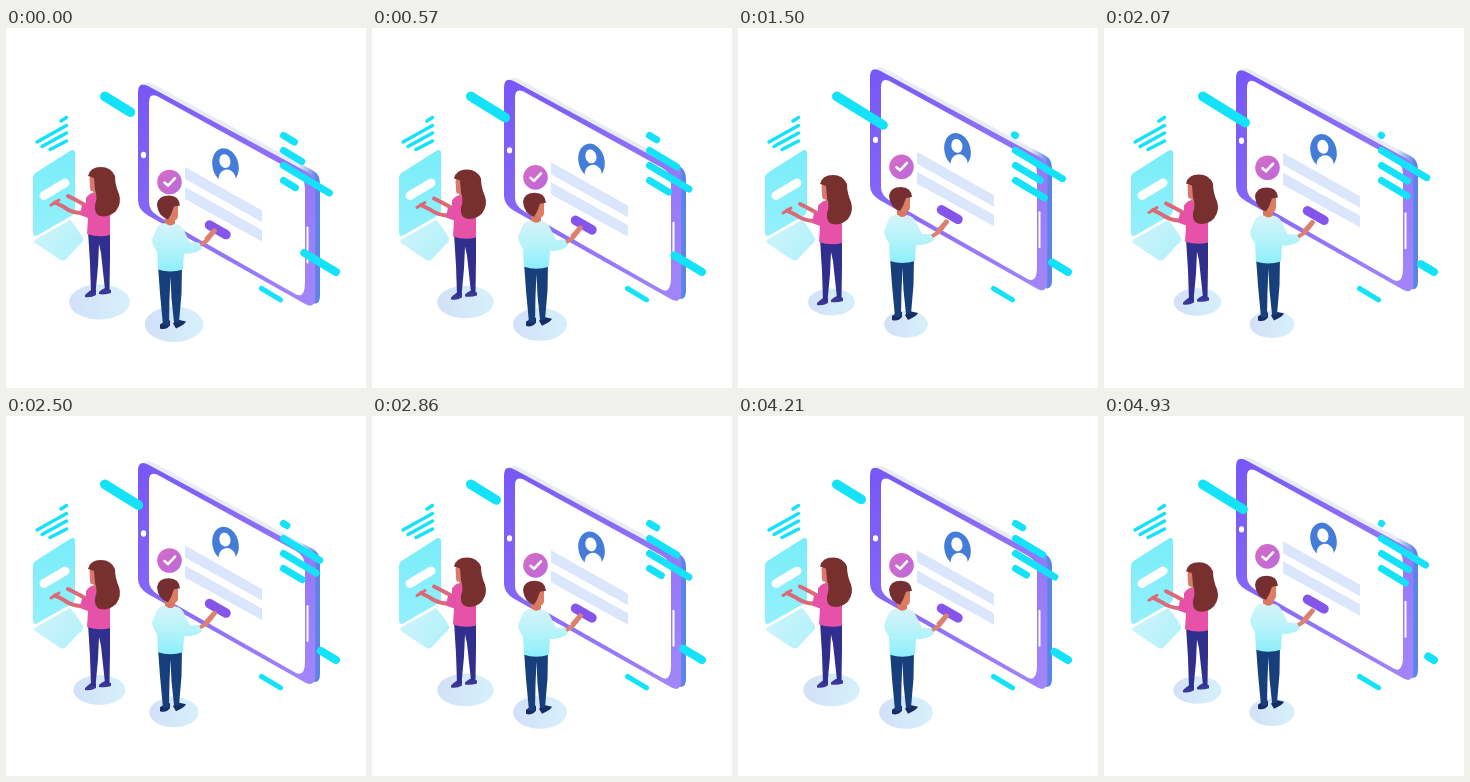
These frames come from a looping animation (360 by 360 pixels, 5 s). An HTML page:

```html
<!DOCTYPE html>
<html lang="en">
<head>
<meta charset="utf-8">
<title>Isometric sign-up</title>
<style>
html, body { margin: 0; width: 100%; height: 100%; overflow: hidden; background: #fff; }
svg { display: block; width: 100vw; height: 100vh; }
.line { fill: none; stroke-linecap: round; stroke-linejoin: round; }
</style>
</head>
<body>
<svg viewBox="0 0 360 360">
  <defs>
    <linearGradient id="frame" x2="1" y2="1"><stop stop-color="#7657f6"/><stop offset="1" stop-color="#a486fa"/></linearGradient>
    <linearGradient id="side"><stop offset=".88" stop-color="#e8ecf7"/><stop offset=".98" stop-color="#5b84e6"/></linearGradient>
    <linearGradient id="badge" x2="1" y2="1"><stop stop-color="#d66cc4"/><stop offset="1" stop-color="#bb69dc"/></linearGradient>
    <linearGradient id="panel" x2="0" y2="1"><stop stop-color="#78edf9"/><stop offset="1" stop-color="#94f0fb"/></linearGradient>
    <linearGradient id="pad" x2="1" y2=".6"><stop stop-color="#d2f4fb"/><stop offset="1" stop-color="#b4f1fa"/></linearGradient>
    <linearGradient id="shirt" x2="0" y2="1"><stop stop-color="#d6f3fa"/><stop offset=".5" stop-color="#b6f3fa"/><stop offset="1" stop-color="#8ceffa"/></linearGradient>
    <linearGradient id="shade"><stop stop-color="#d2e0f8"/><stop offset="1" stop-color="#d6f1fb"/></linearGradient>
    <path id="slab" d="M132 50Q132 38 143 44L302 130Q309 134 309 143V255Q309 266 300 262L142 173Q132 167 132 158Z"/>
  </defs>

  <g class="line" stroke="#13e2f8" stroke-width="3.4">
    <path d="M55 93L60.500 89.500M31 114L60.500 97.500M36 118.500L60.500 105M44 121.500L60.500 113"/>
  </g>
  <path fill="url(#pad)" d="M30 211L64 192Q67 194 77 210Q78 214 73 217L60 231Q57 234 53 231L29 215Q27 213 30 211Z"/>
  <path fill="url(#panel)" d="M27 150Q27 146 31 144L64 123Q69 120 69 126V182Q69 186 65 188L32 207Q27 210 27 204Z"/>
  <path class="line" stroke="#fff" stroke-width="9" d="M38 167.500L59 155"/>

  <g id="phone">
    <use href="#slab" x="5" y="-2" fill="url(#side)"/>
    <use href="#slab" fill="url(#frame)"/>
    <path fill="#fff" d="M143 60Q143 50 151 53.500L290 130Q299 135 299 146V240Q299 256 290 252L152 173.500Q143 168 143 160Z"/>
    <ellipse cx="137.500" cy="112.500" rx="2.600" ry="3.200" fill="#fff"/>
    <path class="line" stroke="#fff" stroke-width="2" d="M301.500 185V220"/>
    <path fill="#dae6fb" d="M179 124.500L256 168V179.500L179 136.500ZM179 144.500L256 187.500V199L179 156.500Z"/>
    <g transform="rotate(-14 219.500 123)">
      <ellipse cx="219.500" cy="123" rx="13" ry="17.500" fill="#437dd8"/>
      <ellipse cx="218" cy="136" rx="8.500" ry="9" fill="#fff"/>
      <ellipse cx="220" cy="118.500" rx="5.500" ry="7" fill="#fff"/>
    </g>
    <circle cx="163.500" cy="139.500" r="12.300" fill="url(#badge)"/>
    <path class="line" stroke="#fff" stroke-width="2.600" d="M158.500 140L162 143L169 135.500"/>
    <path class="line" stroke="#8554ea" stroke-width="9.500" d="M203.500 182.500L220 192"/>
  </g>

  <g id="bars" class="line" stroke="#13e2f8"></g>

  <g id="shadowA"><ellipse rx="30.500" ry="17.500" fill="url(#shade)"/></g>
  <g id="shadowB"><ellipse rx="29.300" ry="17.800" fill="url(#shade)"/></g>

  <g id="woman">
    <path fill="#3a3796" d="M79 267Q82 264 85 262H90V267Q85 270 79 269ZM93 264Q96 261 99 260L105 262V265Q99 267 93 266Z"/>
    <path fill="#302f8e" d="M82 203H104L104 230L103.500 262H99L95 225L93 216L92 238L89.500 265H85L84 235Z"/>
    <path class="line" stroke="#da6a78" stroke-width="4" d="M81 178L68 171L62 168"/>
    <path fill="#e652a8" d="M80 170Q84 163 94 164L104 167Q107 175 104 188L104 207Q93 210 81 206L82 190L74 187L76 177L80 177Z"/>
    <path class="line" stroke="#da6a78" stroke-width="4" d="M77 185Q66 185 58 179L49 174.500"/>
    <path class="line" stroke="#da6a78" stroke-width="3" d="M53 172L45 177"/>
    <path class="line" stroke="#e652a8" stroke-width="7" d="M89 184L78 184"/>
    <path fill="#d9786f" d="M83.500 150Q86 145 94 148V166Q89 169 87 163Q84 164 84 159Z"/>
    <path fill="#78302f" d="M82 148Q84 139 95 139Q105 139 109 148Q109 157 113 166Q116 175 110 183Q103 190 94 188Q88 186 89 177Q92 170 89 162L88 150Z"/>
  </g>

  <g id="man">
    <path fill="#172c62" d="M154 288L160 284H164V289Q160 294 154 292ZM167 287L171 283L180 285Q179 288 170 292Z"/>
    <path fill="#173f7c" d="M152 229H176L175.500 257L173 286H168L165.500 262L164.500 240L163.500 262L163 289H157L154 257Z"/>
    <path class="line" stroke="#dc8070" stroke-width="4" d="M190 211L201 204L209 194"/>
    <path class="line" stroke="#dc8070" stroke-width="3" d="M200 202L208 193"/>
    <path fill="#d9775f" d="M159 173H169V190Q164 194 159 189Z"/>
    <path fill="url(#shirt)" d="M151 191Q155 186 160 187Q164 191 169 187Q176 188 179 196L184 206L193 206L196 212Q189 218 178 217L177 233Q164 237 152 233L151 215Q146 208 146 203Z"/>
    <path fill="#dc7d66" d="M159 166H172V176Q173 184 167 184Q160 182 159 176Z"/>
    <path fill="#762f31" d="M151 168Q152 159 163 159Q173 159 174 169L168 170L165 178L162 183Q152 180 151 168Z"/>
  </g>
</svg>
<script>
const LOOP = 5000, STEPS = 70;
const el = id => document.getElementById(id);
const mix = (a, b, k) => a + (b - a) * k;

// Cosine-eased value through a list of [time, value] turning points.
function ease(keys, t) {
  const i = keys.findIndex(([time]) => time > t);
  const [t0, a] = keys[i - 1], [t1, b] = keys[i];
  return mix(a, b, (1 - Math.cos(Math.PI * (t - t0) / (t1 - t0))) / 2);
}

const longBar = [[-400, 127], [1600, 150], [3560, 120.6], [5520, 150]];
const lowBar = [[-150, 294], [2070, 313], [3300, 305], [5200, 321]];

// Bars grow from a fixed tip; "dir" is -1 when the right end is fixed.
const bars = [
  { x: 94, y: 63.5, w: 9.6, slope: .62, tip: (u, t) => ease(longBar, t) },
  { x: 274, y: 104, w: 7, tip: u => mix(279.5, 292, u) },
  { x: 274, y: 119, w: 7, tip: u => mix(329, 299, u) },
  { x: 274, y: 134, w: 7, tip: u => mix(305, 327, u) },
  { x: 274, y: 149, w: 7, tip: (u, t) => 310 - .82 * (150 - ease(longBar, t)) },
  { x: 334, y: 248, w: 8, dir: -1, tip: (u, t) => ease(lowBar, t) },
  { x: 253, y: 258, w: 5, tip: () => 277 }
];
for (const bar of bars) {
  bar.path = document.createElementNS("http://www.w3.org/2000/svg", "path");
  bar.path.setAttribute("stroke-width", bar.w);
  el("bars").append(bar.path);
}

function drawBar({ x, y, w, slope = .6, dir = 1, tip, path }, u, t) {
  const r = dir * w / 2, span = tip(u, t) - x - 2 * r;
  path.setAttribute("d", `M${x + r} ${y + r}l${span} ${span * slope}`);
}

const place = (id, x, y, s = 1) =>
  el(id).setAttribute("transform", `translate(${x} ${y}) scale(${s})`);

function draw(now) {
  const step = Math.min(STEPS - 1, Math.floor((now % LOOP + 4.9) * STEPS / LOOP));
  const t = step * LOOP / STEPS;
  const u = (1 + Math.cos(2 * Math.PI * (t + 105) / 3640)) / 2;
  place("phone", 0, 15.9 * u - 1.2);
  place("man", 0, 9 * u - .4);
  place("woman", 0, 8.3 * (1 - u));
  place("shadowA", 93.5, 274, mix(.76, 1, u));
  place("shadowB", 168, 296.3, mix(.74, 1, u));
  for (const bar of bars) drawBar(bar, u, t);
}

const start = performance.now();
(function tick() {
  draw(performance.now() - start);
  requestAnimationFrame(tick);
})();
</script>
</body>
</html>
```
